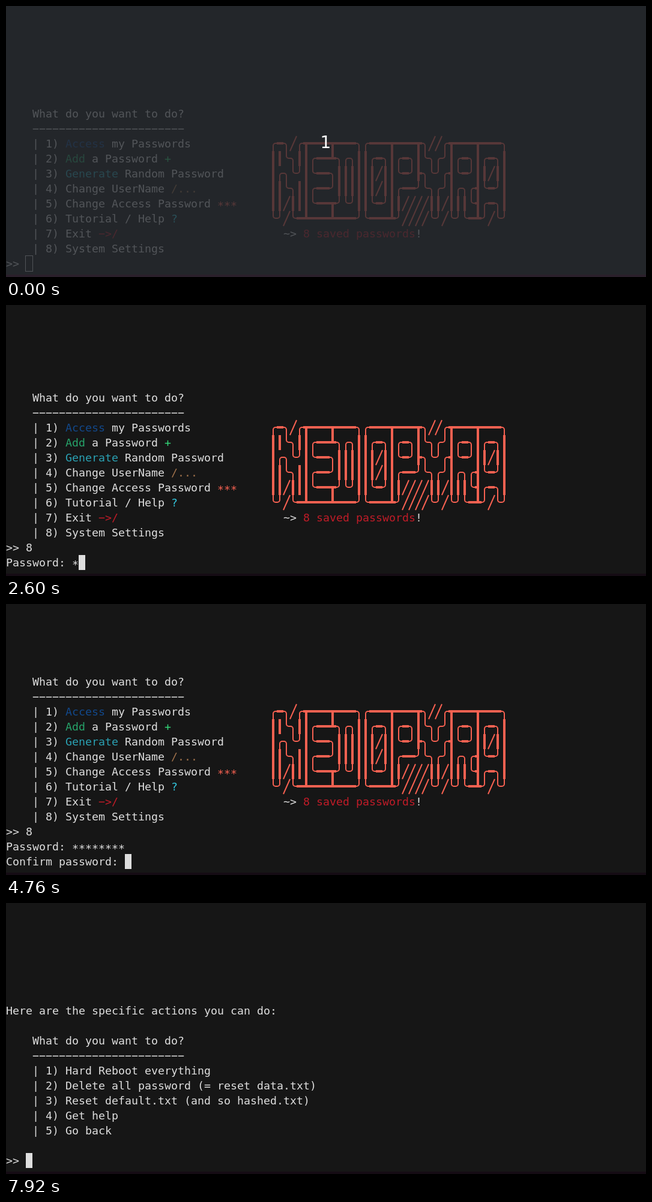
An HTML page with a canvas that plays this animation: 1066x452 px, repeating every 8000 ms.

```html
<!DOCTYPE html>
<html lang="en">
<head>
<meta charset="utf-8">
<title>Terminal</title>
<style>
html, body { margin: 0; width: 100%; height: 100%; overflow: hidden; background: #161616; }
canvas { display: block; }
</style>
</head>
<body>
<canvas id="stage" width="1066" height="452"></canvas>
<script>
const ctx = document.getElementById('stage').getContext('2d');
const W = 1066, H = 452, LOOP = 8000;
const CELL = 11, LINE = 25, BOTTOM = 417, BASE = 19;
const BG = '#161616', FG = '#dedede';
const RED = '#c01c28', CORAL = '#f66151', BLUE = '#12488b', GREEN = '#26a269',
  LIME = '#33da7a', CYAN = '#2aa1b3', SKY = '#33c7de', BROWN = '#a2734c';

// Wide dash and centred star.
const DASH = '\u2212', STAR = '\u2217';
const QUESTION = ['    What do you want to do?', '    ' + DASH.repeat(23)];

// A line is a list of parts: plain text, or [text, colour].
const MENU = [
  ...QUESTION.map(s => [s]),
  ['    | 1) ', ['Access', BLUE], ' my Passwords'],
  ['    | 2) ', ['Add', GREEN], ' a Password ', ['+', LIME]],
  ['    | 3) ', ['Generate', CYAN], ' Random Password'],
  ['    | 4) Change UserName ', ['/...', BROWN]],
  ['    | 5) Change Access Password ', [STAR.repeat(3), CORAL]],
  ['    | 6) Tutorial / Help ', ['?', SKY]],
  ['    | 7) Exit ', [DASH + '>/', RED], ' '.repeat(25) + '~> ', ['8 saved passwords', RED], '!'],
  ['    | 8) System Settings']
];
const SETTINGS = [
  'Here are the specific actions you can do:', '',
  ...QUESTION,
  '    | 1) Hard Reboot everything',
  '    | 2) Delete all password (= reset data.txt)',
  '    | 3) Reset default.txt (and so hashed.txt)',
  '    | 4) Get help',
  '    | 5) Go back', ''
].map(s => [s]);

const BANNER = [
  '╭━╮╱╭┳━━━┳━━━╮╭━━━┳━━━┳╮╱╱╭┳━━━┳━━━╮',
  '┃┃╰╮┃┃╭━━┻╮╭╮┃┃╭━╮┃╭━╮┃╰╮╭╯┃╭━╮┃╭━╮┃',
  '┃╭╮╰╯┃╰━━╮┃┃┃┃┃┃╱┃┃╰━╯┣╮╰╯╭┫╰━╯┃┃╱┃┃',
  '┃┃╰╮┃┃╭━━╯┃┃┃┃┃┃╱┃┃╭━━╯╰╮╭╯┃╭╮╭┫╰━╯┃',
  '┃┃╱┃┃┃╰━━┳╯╰╯┃┃╰━╯┃┃╱╱╱╱┃┃╱┃┃┃╰┫╭━╮┃',
  '╰╯╱╰━┻━━━┻━━━╯╰━━━┻╯╱╱╱╱╰╯╱╰╯╰━┻╯╱╰╯'
];
const BANNER_COL = 40;

// Arms of the heavy pieces, and the direction of the rounded corners.
const HEAVY = { '━': 'lr', '┃': 'ud', '┳': 'lrd', '┻': 'lru', '┣': 'udr', '┫': 'udl' };
const CORNER = { '╭': [1, 1], '╮': [-1, 1], '╰': [1, -1], '╯': [-1, -1] };

const PASSWORD = [2600, 2920, 3120, 3280, 3720, 3800, 4120, 4160];
const CONFIRM = [5520, 5920, 6120, 6320, 6760, 6880, 7160, 7200];

function stars(times, t) {
  return STAR.repeat(times.filter(at => t >= at).length);
}

// Writes one cell per character and returns the column after the last.
function print(parts, y) {
  let col = 0;
  for (const part of parts) {
    const [text, color] = Array.isArray(part) ? part : [part, FG];
    ctx.fillStyle = color;
    for (const ch of text) ctx.fillText(ch, col++ * CELL, y + BASE);
  }
  return col;
}

function drawBox(ch, x, y) {
  const cx = x + 5, cy = y + 12, right = x + CELL, low = y + LINE;
  if (HEAVY[ch]) {
    for (const arm of HEAVY[ch]) {
      if (arm === 'l') ctx.fillRect(x, cy - 2, cx + 2 - x, 4);
      if (arm === 'r') ctx.fillRect(cx - 2, cy - 2, right - cx + 2, 4);
      if (arm === 'u') ctx.fillRect(cx - 2, y, 4, cy + 2 - y);
      if (arm === 'd') ctx.fillRect(cx - 2, cy - 2, 4, low - cy + 2);
    }
    return;
  }
  ctx.beginPath();
  if (ch === '╱') {
    ctx.moveTo(x, low);
    ctx.lineTo(right, y);
  } else {
    const [dx, dy] = CORNER[ch];
    const endX = dx > 0 ? right : x;
    ctx.moveTo(cx, dy > 0 ? low : y);
    ctx.arcTo(cx, cy, endX, cy, 4);
    ctx.lineTo(endX, cy);
  }
  ctx.stroke();
}

function drawBanner(top) {
  ctx.fillStyle = ctx.strokeStyle = CORAL;
  ctx.lineWidth = 2;
  BANNER.forEach((row, r) => [...row].forEach((ch, c) =>
    drawBox(ch, (BANNER_COL + c) * CELL, top + r * LINE)));
}

function screenAt(t) {
  if (t >= 7920) return [...SETTINGS, ['>> ']];
  const lines = [...MENU, [t >= 840 ? '>> 8' : '>> ']];
  if (t >= 1720) lines.push(['Password: ' + stars(PASSWORD, t)]);
  if (t >= 4760) lines.push(['Confirm password: ' + stars(CONFIRM, t)]);
  return lines;
}

function drawCountdown() {
  ctx.strokeStyle = FG;
  ctx.lineWidth = 1;
  ctx.strokeRect(32.5, 416.5, 12, 26);
  ctx.fillStyle = 'rgba(39,44,49,.77)';
  ctx.fillRect(0, 0, W, H);
  ctx.fillStyle = '#fff';
  ctx.font = '28px "DejaVu Sans", sans-serif';
  ctx.textAlign = 'center';
  ctx.fillText('1', 532.5, 237);
  ctx.textAlign = 'left';
}

function draw(t) {
  ctx.fillStyle = BG;
  ctx.fillRect(0, 0, W, H);
  ctx.font = '18.27px "DejaVu Sans Mono", monospace';
  const lines = screenAt(t);
  const top = BOTTOM - (lines.length - 1) * LINE;
  let col = 0;
  lines.forEach((line, i) => { col = print(line, top + i * LINE); });
  if (t < 7920) drawBanner(top + 2 * LINE);

  const blinkedOff = (t >= 1400 && t < 1680) || (t >= 7760 && t < 7880);
  if (t < 40) {
    drawCountdown();
  } else if (!blinkedOff) {
    ctx.fillStyle = FG;
    ctx.fillRect(col * CELL, BOTTOM, CELL, LINE);
  }
  ctx.fillStyle = t < 40 ? '#2a202b' : '#150c14';
  ctx.fillRect(0, 448, W, 4);
}

const start = performance.now();
function tick() {
  draw((performance.now() - start) % LOOP);
  requestAnimationFrame(tick);
}
tick();
</script>
</body>
</html>
```
